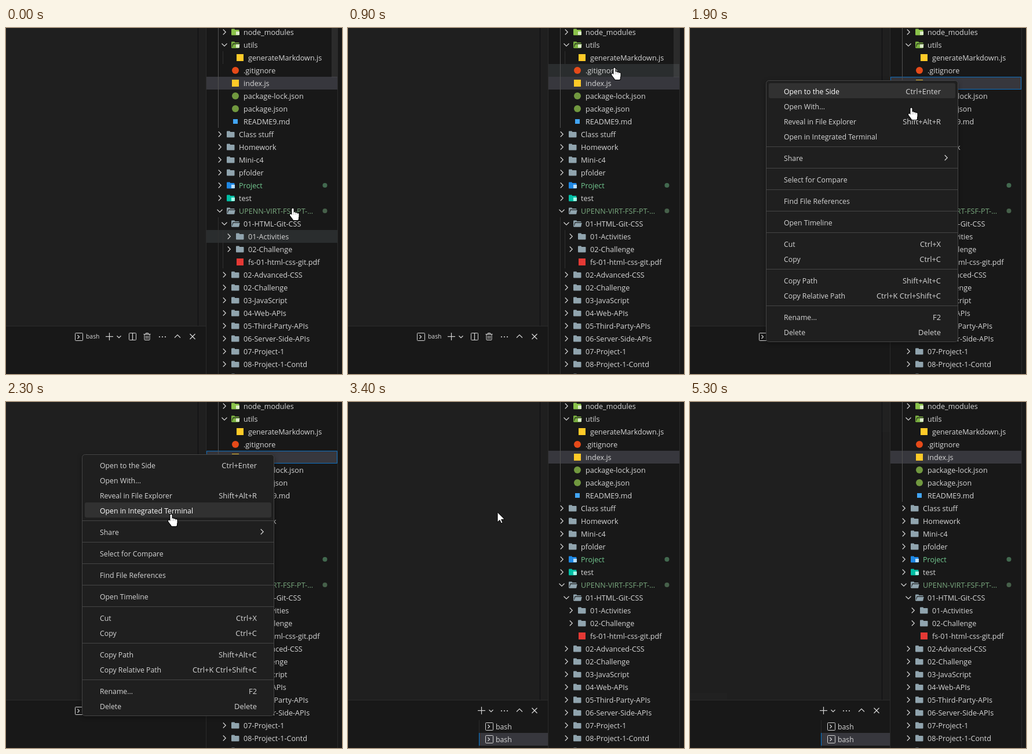
These frames come from a looping animation (580x596 px, 5.4 s). An HTML page with a canvas:

```html
<!DOCTYPE html>
<html lang="en">
<head>
<meta charset="utf-8">
<title>Open in Integrated Terminal</title>
<style>
html, body { margin: 0; width: 100%; height: 100%; overflow: hidden; background: #181818; }
canvas { display: block; width: 580px; height: 596px; }
</style>
</head>
<body>
<canvas id="stage" width="580" height="596"></canvas>
<script>
const ctx = document.getElementById('stage').getContext('2d');
const LOOP = 5400, STEP = 100;
const MENU_OPEN = 1700, SUBMENU_OPEN = 2700, MENU_CLOSE = 3300;
const TABS_OPEN = 3400, BARS_ON = 3500, BARS_FADE = 4500;
const FONT = '"Open Sans", "Noto Sans", sans-serif';
const TEXT = '#d6d6d6', LINE = '#2b2b2b', SELECT = '#37373d', FOCUS = '#0e6fc0';
const SLATE = '#90a4ae', ROW = 22;

// Pointer stops; each leg slows down towards its end
const STOPS = [
  { t: -100, x: 501, y: 352 },
  { t: 900, x: 460, y: 68 },
  { t: 1500, x: 467, y: 89 },
  { t: MENU_OPEN, x: 463, y: 91 },
  { t: 2300, x: 285, y: 193 },
  { t: SUBMENU_OPEN, x: 272, y: 222 },
  { t: 3000, x: 264, y: 191 },
  { t: MENU_CLOSE, x: 258, y: 190 },
  { t: 4400, x: 258, y: 190 },
  { t: 4800, x: 300, y: 600 },
  { t: LOOP, x: 300, y: 600 }
];

// Two spaces per level; a folder is open when the next line is deeper
const OUTLINE = `
  node_modules
  utils
    generateMarkdown.js
  .gitignore
  index.js
  package-lock.json
  package.json
  README9.md
Class stuff
Homework
Mini-c4
pfolder
Project
test
UPENN-VIRT-FSF-PT-...
  01-HTML-Git-CSS
    01-Activities
    02-Challenge
    fs-01-html-css-git.pdf
  02-Advanced-CSS
  02-Challenge
  03-JavaScript
  04-Web-APIs
  05-Third-Party-APIs
  06-Server-Side-APIs
  07-Project-1
  08-Project-1-Contd
  09-NoSQL`.slice(1).split('\n');

const FILES = {
  js: '#ffca28', gitignore: '#e64a19', json: '#71983f', md: '#42a5f5', pdf: '#e53935'
};
const FOLDERS = {
  node_modules: ['#8bc34a', '#dcedc8'], utils: ['#7cb342', '#dcedc8'],
  Project: ['#1e88e5', '#bbdefb'], test: ['#00bfa5', '#a7ffeb']
};
const CHANGED = {
  Project: ['#73c991', '#42694f'], 'UPENN-VIRT-FSF-PT-...': ['#7aa97f', '#46604a']
};

const depthOf = line => line ? line.search(/\S/) / 2 : 0;
const TREE = OUTLINE.map((line, i) => ({
  name: line.trim(),
  depth: depthOf(line),
  type: (line.match(/\.(\w+)$/) || [])[1],
  open: depthOf(OUTLINE[i + 1]) > depthOf(line)
}));
const SELECTED = TREE.findIndex(row => row.name === 'index.js');
const FIRST_ROOT = TREE.findIndex(row => row.depth === 0);

// Menu groups: [label, shortcut]
const MENU = [
  [['Open to the Side', 'Ctrl+Enter'], ['Open With...', ''],
   ['Reveal in File Explorer', 'Shift+Alt+R'], ['Open in Integrated Terminal', '']],
  [['Share', '>']],
  [['Select for Compare', '']],
  [['Find File References', '']],
  [['Open Timeline', '']],
  [['Cut', 'Ctrl+X'], ['Copy', 'Ctrl+C']],
  [['Copy Path', 'Shift+Alt+C'], ['Copy Relative Path', 'Ctrl+K Ctrl+Shift+C']],
  [['Rename...', 'F2'], ['Delete', 'Delete']]
];

function pointerAt(t) {
  const i = Math.max(1, STOPS.findIndex(s => s.t >= t));
  const a = STOPS[i - 1], b = STOPS[i];
  const k = 1 - Math.pow(1 - (t - a.t) / (b.t - a.t), 1.5);
  return { x: a.x + (b.x - a.x) * k, y: a.y + (b.y - a.y) * k };
}

function rect(x, y, w, h, color) {
  ctx.fillStyle = color;
  ctx.fillRect(x, y, w, h);
}

function box(x, y, w, h, r, fill, edge) {
  ctx.beginPath();
  ctx.roundRect(x, y, w, h, r);
  if (fill) { ctx.fillStyle = fill; ctx.fill(); }
  if (edge) { ctx.strokeStyle = edge; ctx.lineWidth = 1; ctx.stroke(); }
}

function dot(x, y, r, color) {
  box(x - r, y - r, 2 * r, 2 * r, r, color);
}

function label(s, x, y, { size = 12.3, color = TEXT, align = 'left' } = {}) {
  ctx.font = `${size}px ${FONT}`;
  ctx.textAlign = align;
  ctx.fillStyle = color;
  ctx.fillText(s, x, y);
}

function stroke(points, color = TEXT, width = 1.2) {
  ctx.beginPath();
  points.forEach(([x, y]) => ctx.lineTo(x, y));
  ctx.strokeStyle = color;
  ctx.lineWidth = width;
  ctx.stroke();
}

// Angle in quarter turns: 0 points right, 1 down, -1 up
function chevron(x, y, turn, r = 4.5) {
  ctx.save();
  ctx.translate(x, y);
  ctx.rotate(turn * Math.PI / 2);
  stroke([[-r / 2, -r], [r / 2, 0], [-r / 2, r]]);
  ctx.restore();
}

function folder(x, y, open, [color, badge]) {
  box(x - 7, y - 5.5, 6, 4, 1, color);
  box(x - 7, y - 4, 13.5, 9.5, 1, color);
  if (open) {
    stroke([[x - 5.5, y + 3.5], [x - 4, y - 1.8], [x + 6.5, y - 1.8]], '#181818');
    ctx.save();
    ctx.transform(1, 0, -.35, 1, x, y);
    box(-4, -1, 11.5, 6.5, 0, color);
    ctx.restore();
  }
  if (badge) rect(x + 1, y - 1, 6, 6, badge);
}

function fileIcon(x, y, type) {
  const color = FILES[type];
  if (type === 'json' || type === 'gitignore') dot(x, y, 6, color);
  else if (type === 'md') rect(x - 4, y - 4, 8, 8, color);
  else rect(x - 6, y - 6, 12, 12, color);
}

function drawRow({ name, depth, type, open }, i, browsing) {
  const y = 7 + ROW * i, x = 388 + 8 * depth;
  const [ink, status] = CHANGED[name] || [TEXT];
  for (let k = 0; k < depth; k++) {
    const lit = k === 0 && i < FIRST_ROOT;
    if (lit || browsing) rect(366 + 8 * k, y - 11, 1, ROW, lit ? '#505050' : '#303030');
  }
  if (type) fileIcon(x, y, type);
  else {
    chevron(x - 19, y, open ? 1 : 0);
    folder(x, y, open, FOLDERS[name] || [SLATE]);
  }
  label(name, x + 14, y + 5, { size: 12.6, color: ink });
  if (status) dot(550.5, y, 4, status);
}

function drawTree(t, hover, menuOpen) {
  const browsing = t < MENU_OPEN;
  const top = i => ROW * i - 4;
  rect(345, 0, 1, 596, LINE);
  rect(572, 0, 1, 596, LINE);
  if (browsing) rect(346, top(Math.floor((hover.y + 4) / ROW)), 226, ROW, '#2a2d2e');
  rect(346, top(SELECTED), 226, ROW, SELECT);
  if (menuOpen) box(346.5, top(SELECTED) + .5, 225, ROW - 1, 0, null, FOCUS);
  TREE.forEach((row, i) => drawRow(row, i, browsing));
  if (browsing) rect(562, 0, 10, 85, 'rgba(121,121,121,.2)');
}

function drawEditor(t) {
  rect(0, 0, 345, 513, '#1f1f1f');
  rect(331, 0, 1, 513, '#0c0d10');
  if (t >= BARS_ON) {
    const fade = Math.min(1, (LOOP - t) / (LOOP - BARS_FADE));
    const color = `rgba(121,121,121,${.26 * fade})`;
    rect(331, 0, 14, 52, color);
    rect(0, 501, 64, 12, color);
  }
}

function shellIcon(x, y) {
  box(x + .5, y + .5, 13, 13, 1, null, TEXT);
  chevron(x + 6, y + 7, 0, 3);
}

function plusMenu(x, y) {
  stroke([[x - 6.5, y], [x + 6.5, y]]);
  stroke([[x, y - 6.5], [x, y + 6.5]]);
  chevron(x + 16.5, y + .5, 1, 3.5);
}

function bin(x, y) {
  stroke([[x - 6, y - 4], [x + 6, y - 4]]);
  box(x - 2, y - 6, 4, 2, 0, null, TEXT);
  box(x - 4.5, y - 4, 9, 10, 1, null, TEXT);
  [-1.5, 1.5].forEach(dx => stroke([[x + dx, y - 1.5], [x + dx, y + 4]]));
}

function drawPanel(t) {
  const y = 531.5;
  rect(0, 513, 345, 1, LINE);
  if (t >= TABS_OPEN) {
    plusMenu(230.5, y);
    rect(226, 548, 1, 48, LINE);
    rect(226, 570, 119, ROW, SELECT);
    rect(226, 570, 1, ROW, '#0078d4');
    [559, 559 + ROW].forEach(cy => {
      shellIcon(237, cy - 7);
      label('bash', 255, cy + 5);
    });
  } else {
    shellIcon(119, 525);
    label('bash', 138, 535, { size: 10.4 });
    plusMenu(178.5, y);
    box(212.5, 525.5, 12, 12, 1, null, TEXT);
    stroke([[218.5, 525.5], [218.5, 537.5]]);
    bin(243.5, y);
  }
  [-5, 0, 5].forEach(dx => dot(270 + dx, 532, 1.1, TEXT));
  chevron(296, 531, -1, 5);
  [-4.5, 4.5].forEach(d => stroke([[322 - d, y - 4.5], [322 + d, y + 4.5]]));
}

function shadowBox(x, y, w, h) {
  ctx.save();
  ctx.shadowColor = 'rgba(0,0,0,.4)';
  ctx.shadowBlur = 8;
  ctx.shadowOffsetY = 2;
  box(x, y, w, h, 5, '#1f1f1f');
  ctx.restore();
  box(x, y, w, h, 5, null, '#454545');
}

function drawMenu(t, hover) {
  if (t >= SUBMENU_OPEN) {
    shadowBox(-60.5, 205.5, 192, 35);
    label('Copy vscode.dev Link', 102, 229, { align: 'right' });
  }
  shadowBox(131.5, 90.5, 331, 450);
  let y = 109;
  MENU.forEach((group, g) => {
    if (g) {
      rect(132, y - 9, 330, 1, '#454545');
      y += 11;
    }
    group.forEach(([name, keys]) => {
      const on = hover.x < 458 && Math.abs(hover.y - y) <= 13;
      if (on) box(136, y - 14, 322, 26, 3, '#313131');
      label(name, 162, y + 5, { color: on ? '#ffffff' : TEXT });
      if (keys === '>') chevron(442, y - .5, 0);
      else label(keys, 433, y + 5, { size: 12.9, align: 'right' });
      y += 26;
    });
  });
}

function drawHand() {
  const shape = (color, grow) => {
    const limb = (x0, y0, x1, y1) => stroke([[x0, y0], [x1, y1]], color, 3 + grow);
    limb(0, 2, 0, 14);
    limb(-3.5, 12, 1, 18);
    for (let i = 1; i < 4; i++) limb(3 * i, 7.5 + i, 3 * i, 15);
    box(-grow / 2, 12, 10 + grow, 9 + grow / 2, 2, color);
  };
  shape('#000', 2);
  shape('#fff', 0);
}

function drawArrow() {
  const side = 17, reach = side * Math.SQRT1_2;
  ctx.beginPath();
  [[0, 0], [0, side], [4, 13.4], [6.5, 19], [9, 18], [6.6, 12.3], [reach, reach]]
    .forEach(([x, y]) => ctx.lineTo(x, y));
  ctx.closePath();
  ctx.fillStyle = '#fff';
  ctx.strokeStyle = '#000';
  ctx.lineWidth = 1;
  ctx.fill();
  ctx.stroke();
}

function drawPointer({ x, y }, hand) {
  ctx.save();
  ctx.translate(Math.round(x), Math.round(y));
  ctx.lineCap = ctx.lineJoin = 'round';
  if (hand) drawHand();
  else drawArrow();
  ctx.restore();
}

function draw(t) {
  const menuOpen = t >= MENU_OPEN && t < MENU_CLOSE;
  const hover = pointerAt(t - STEP); // hover trails the pointer
  rect(0, 0, 580, 596, '#181818');
  drawEditor(t);
  drawPanel(t);
  drawTree(t, hover, menuOpen);
  if (menuOpen) drawMenu(t, hover);
  drawPointer(pointerAt(t), t < MENU_CLOSE);
}

function tick() {
  const t = performance.now() % LOOP;
  draw(Math.floor(t / STEP) * STEP);
  requestAnimationFrame(tick);
}
tick();
</script>
</body>
</html>
```
